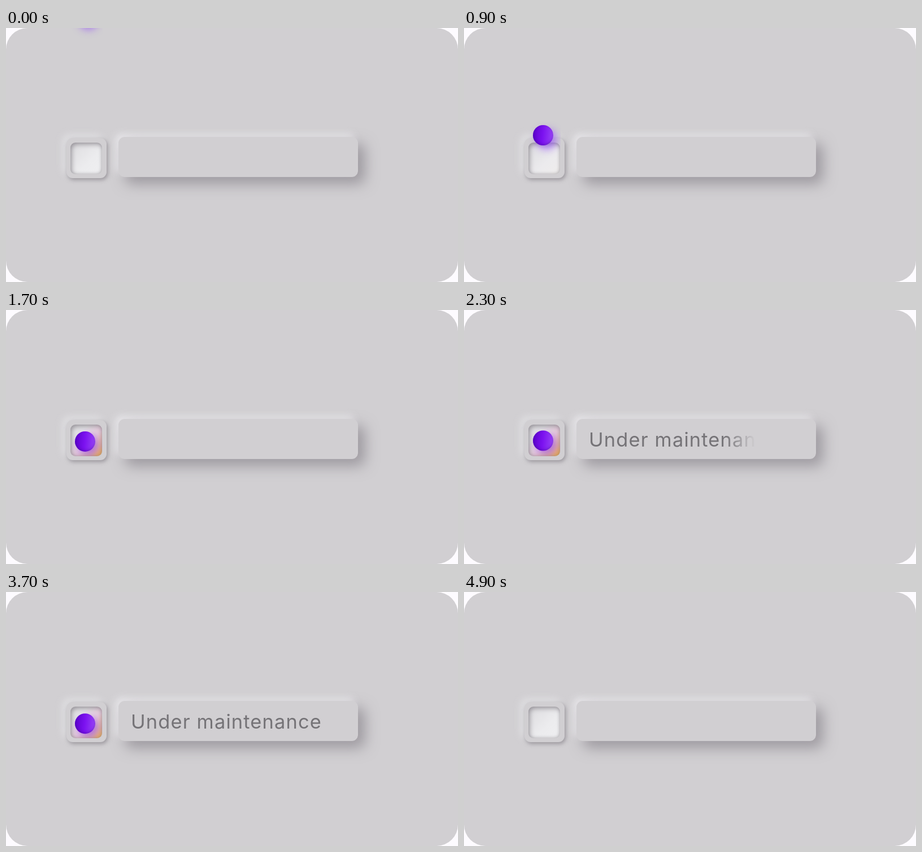
Recreate the animation shown at these times as an HTML page. Size 800 by 450 pixels, loop 5500 ms.

```html
<!DOCTYPE html>
<html lang="en">
<head>
<meta charset="utf-8">
<title>Under maintenance</title>
<style>
  html, body { margin: 0; width: 100%; height: 100%; overflow: hidden; background: #fdfbff; }
  .card, .card div, svg { position: absolute; }
  .card { left: 0; top: 0; width: 800px; height: 450px; border-radius: 38px; background: #d1cfd2; overflow: hidden; }
  .bar {
    left: 199px; top: 193px; width: 424px; height: 71px; border-radius: 11px; background: #d1cfd2;
    box-shadow: 12px 12px 24px rgba(125, 119, 127, .62), -6px -6px 13px rgba(236, 235, 238, .85);
  }
  .frame {
    left: 107px; top: 195px; width: 71px; height: 71px; border-radius: 11px; background: #d1cfd2;
    box-shadow: 2px 3px 7px rgba(115, 110, 118, .6), -7px -6px 14px rgba(228, 227, 230, .8);
  }
  .well, .glow, .shade { left: 114px; top: 203px; width: 56px; height: 56px; border-radius: 9px; }
  .well { background: linear-gradient(135deg, #dcdbde, #ececee 60%, #efeff1); }
  .glow {
    background: linear-gradient(135deg, rgba(215, 190, 225, 0) 28%, rgba(224, 172, 200, .6) 58%,
      rgba(234, 170, 120, .8) 80%, rgba(242, 168, 52, .95) 97%);
  }
  .shade { box-shadow: inset 2px 3px 8px rgba(105, 100, 108, .6), inset -1px -1px 4px rgba(150, 145, 150, .3); }
  .chute { left: 114px; top: 0; width: 57px; height: 259px; border-radius: 0 0 9px 9px; overflow: hidden; }
  .ball {
    left: 8px; top: -18px; width: 36px; height: 36px; border-radius: 50%;
    background: linear-gradient(95deg, #5b00cc, #7c12f0 48%, #9a48f6);
    box-shadow: 6px 7px 14px rgba(142, 66, 250, .6), inset 1px -2px 5px rgba(62, 0, 150, .45);
  }
  svg { left: 0; top: 0; }
  text { font: 400 34.5px Inter, "Open Sans", sans-serif; letter-spacing: 1.1px; fill: #757377; }
</style>
</head>
<body>
<div class="card">
  <div class="bar"></div>
  <div class="frame"></div>
  <div class="well"></div>
  <div class="glow" id="glow"></div>
  <div class="shade"></div>
  <div class="chute"><div class="ball" id="ball"></div></div>
  <svg id="label" width="800" height="450"><text x="221" y="242">Under maintenance</text></svg>
</div>
<script>
  const LOOP = 5500, STEP = 100, LAST_CHANGE = 4900;
  const [ball, glow, label] = ['ball', 'glow', 'label'].map(id => document.getElementById(id));

  // Ball centre while it drops and settles: [ms, y]
  const DROP = [
    [0, -22], [200, -4], [300, 18], [400, 43], [500, 71], [600, 102], [700, 133], [800, 163],
    [900, 190], [1000, 212], [1100, 227], [1200, 234.5], [1400, 235], [1900, 231.5]
  ];

  function ease(t, start, end) {
    const p = Math.min(1, Math.max(0, (t - start) / (end - start)));
    return p * p * (3 - 2 * p);
  }

  function follow(keys, t) {
    const next = keys.findIndex(([time]) => time > t);
    if (next < 0) return keys[keys.length - 1][1];
    const [t0, y0] = keys[next - 1], [t1, y1] = keys[next];
    return y0 + (y1 - y0) * (t - t0) / (t1 - t0);
  }

  function draw(t) {
    const y = follow(DROP, t) + 50.5 * ease(t, 3600, 4500);
    ball.style.transform = `translateY(${y}px)`;
    ball.style.visibility = t >= 4400 ? 'hidden' : 'visible';
    glow.style.opacity = ease(t, 800, 1800) * (1 - ease(t, 3500, 4600));

    const edge = 220 + 400 * ease(t, 1900, 2500);
    const wipe = `linear-gradient(90deg, #000 ${edge - 55}px, transparent ${edge}px)`;
    label.style.webkitMaskImage = label.style.maskImage = wipe;
    label.style.opacity = t < 2000 ? 0 : 1 - ease(t, 3800, 4700);
  }

  // The picture advances in steps and rests at both ends of the loop.
  function tick() {
    const t = Math.floor(performance.now() % LOOP / STEP) * STEP;
    draw(t < 200 ? 0 : Math.min(t, LAST_CHANGE));
    requestAnimationFrame(tick);
  }
  tick();
</script>
</body>
</html>
```
